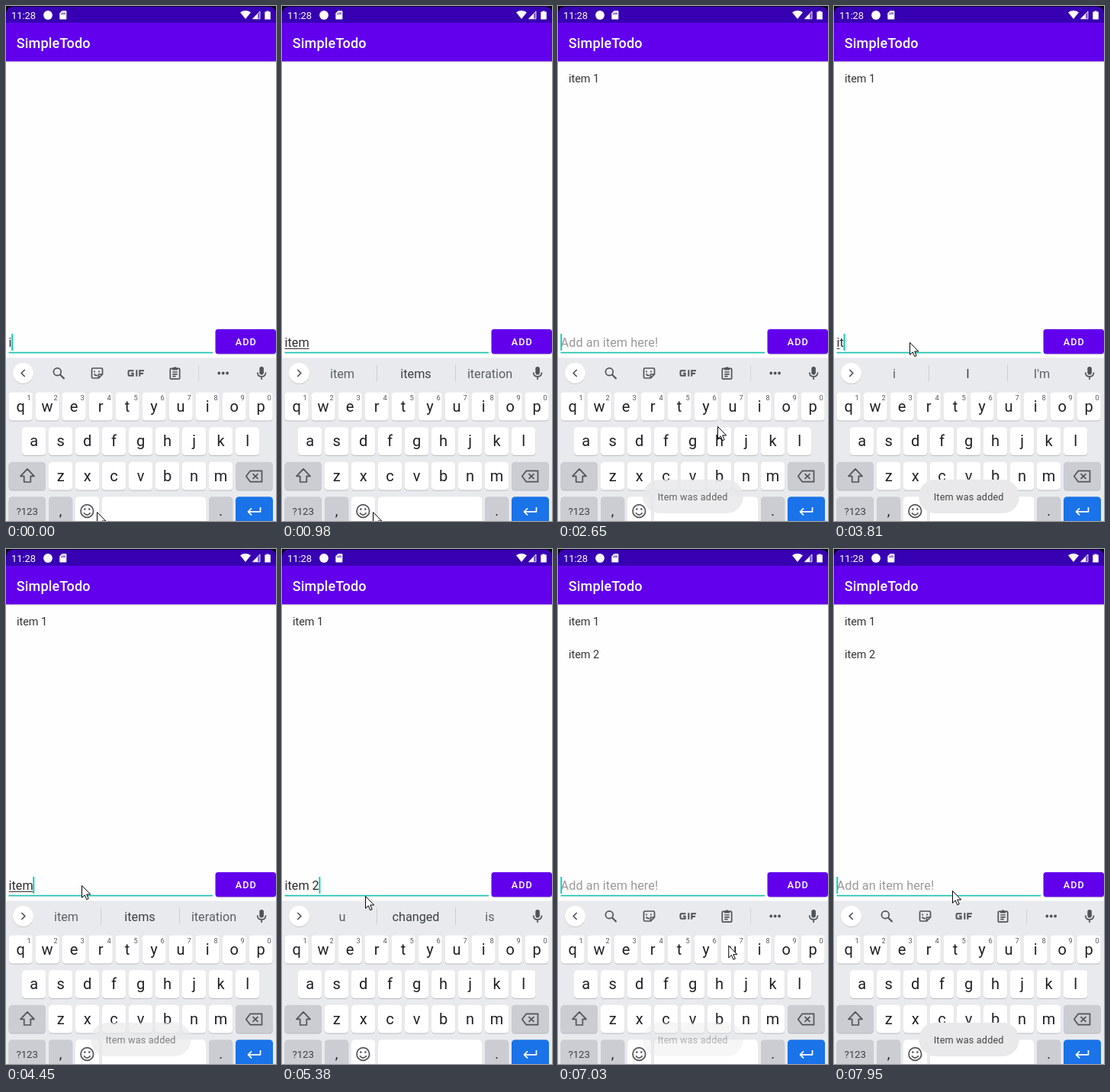
An HTML page that plays this animation: 354x674 px, repeating every 8000 ms.

```html
<!DOCTYPE html>
<html lang="en">
<head>
<meta charset="utf-8">
<title>Todo list</title>
<style>
  html, body { margin: 0; width: 100%; height: 100%; overflow: hidden; background: #fff; }
  svg { display: block; width: 354px; height: 674px; }
  text { font-family: Roboto, "Noto Sans", sans-serif; white-space: pre; }
  .mid { text-anchor: middle; }
  .line { fill: none; stroke: #505357; stroke-width: 1.7; }
  .dark { fill: #505357; }
  .word { font-size: 16.2px; fill: #5b5f64; text-anchor: middle; }
  .item { font-size: 14.4px; fill: #333; }
  .field { font-size: 16.2px; }
</style>
</head>
<body>
<svg viewBox="0 0 354 674" xmlns="http://www.w3.org/2000/svg">
  <defs>
    <linearGradient id="shade" x2="0" y2="1">
      <stop stop-color="#000" stop-opacity=".22"/>
      <stop offset="1" stop-color="#000" stop-opacity="0"/>
    </linearGradient>
    <clipPath id="buttonClip"><rect x="274.500" y="423" width="79.500" height="32.300" rx="3.600"/></clipPath>
  </defs>

  <rect width="354" height="674" fill="#fefefe"/>
  <rect y="72" width="354" height="2.500" fill="url(#shade)"/>
  <rect y="22" width="354" height="50.400" fill="#6200ee"/>
  <rect width="354" height="22" fill="#3700b3"/>
  <path d="M0 0H354V9Q353 .7 345 .7H9Q1 .7 0 9Z"/>
  <g fill="#fff">
    <text x="7" y="16.500" font-size="12.900">11:28</text>
    <circle cx="55" cy="12" r="5.900"/>
    <path d="M73.500 6.300H78.500Q79.300 6.300 79.300 7.200V16.600Q79.300 17.500 78.500 17.500H71.200Q70.300 17.500 70.300 16.600V9.500Z"/>
    <path d="M72.800 9.300v2M74.900 8.300v3M77 8.300v3" stroke="#3700b3"/>
    <path d="M307 8.300Q314 3.500 321 8.300L314 17Z"/>
    <path d="M323.500 16.800L333 7V16.800Z" fill-opacity=".35" stroke="#fff" stroke-width=".8"/>
    <path d="M323.500 16.800L330 10V16.800Z"/>
    <path d="M341.500 6.400h3v1.200h2.300v10h-7.500v-10h2.200z"/>
    <text x="13.800" y="54.800" font-size="18" font-weight="500" letter-spacing=".16">SimpleTodo</text>
  </g>

  <text class="item" id="item1" x="14" y="100">item 1</text>
  <text class="item" id="item2" x="14" y="143.200">item 2</text>

  <text class="field" id="hint" x="3.600" y="446.300" fill="#999" letter-spacing=".08">Add an item here!</text>
  <text class="field" id="entry" x="3.600" y="446.300" fill="#2b2b2b"></text>
  <rect id="composing" x="3.600" y="448" height="1" fill="#333"/>
  <rect x="3.500" y="452.800" width="267.500" height="1.700" fill="#1fc4b0"/>
  <rect id="caret" y="429" width="1.900" height="22" fill="#03cdb9"/>

  <rect x="275" y="424" width="79" height="32.300" rx="3.600" opacity=".18"/>
  <rect x="274.500" y="423" width="79.500" height="32.300" rx="3.600" fill="#6200ee"/>
  <circle id="ripple" cx="304" cy="442" fill="#fff" opacity=".24" clip-path="url(#buttonClip)"/>
  <text x="300.700" y="443.800" font-size="12.600" font-weight="500" letter-spacing="1.120" fill="#fff">ADD</text>

  <rect y="460.500" width="354" height="214" fill="#e8eaed"/>
  <circle cx="22.500" cy="481.300" r="13.700" opacity=".14"/>
  <circle cx="22.500" cy="480.500" r="13.500" fill="#fff"/>
  <path id="chevron" class="line" d="M-2.200 -4.500L2.300 0L-2.200 4.500"/>
  <g id="tools">
    <g class="line">
      <circle cx="67.300" cy="478.800" r="4.900"/>
      <path d="M71 482.500L76.500 488" stroke-width="2.100"/>
      <path d="M114 474H125Q126.500 474 126.500 475.500V482L121.500 487H114Q112.500 487 112.500 485.500V475.500Q112.500 474 114 474ZM126.500 482H121.500V487M115.500 481.500Q117 484 120 483.500M116 477.500v2M122 477.500v2"/>
      <rect x="215.300" y="474.300" width="12.400" height="13.900" rx="1.200"/>
      <path d="M218.300 479h6.400M218.300 481.800h6.400M218.300 484.600h4.400"/>
      <path d="M167.500 477.200H161.800Q160.500 477.200 160.500 478.500V482.500Q160.500 483.800 161.800 483.800H166.600V480.800H164M171.300 476.200V484.800M175.300 484.800V477.200H181M175.300 481H180" style="stroke-width:2"/>
      <path d="M252.500 470.500V490.500" style="stroke:#d0d3d6;stroke-width:1"/>
    </g>
    <path class="dark" d="M218 473.500h2q1.500-3 3 0h2v3h-7z"/>
    <path d="M279.300 480.500h0M284.700 480.500h0M290.100 480.500h0" stroke="#505357" stroke-width="3.800" stroke-linecap="round"/>
  </g>
  <g id="words">
    <path d="M124.500 470V491.500M227.500 470V491.500" stroke="#cdd0d3"/>
    <text class="word" x="79" y="486.800"></text>
    <text class="word" x="175.500" y="486.800" style="fill:#3c4043"></text>
    <text class="word" x="272.500" y="486.800"></text>
  </g>
  <rect class="dark" x="332.300" y="472" width="5.600" height="10.500" rx="2.800"/>
  <path class="line" d="M329.700 479.500Q329.700 485 335.100 485T340.500 479.500M335.100 485V489"/>

  <g id="keys"></g>
  <g class="line" stroke-linejoin="round">
    <path d="M28 605.800L37 615.300H32.300V623H23.700V615.300H19Z"/>
    <path d="M320.300 608.300H335.500V622.700H320.300L314.800 615.500Z"/>
    <path d="M323.500 612.200L330.500 618.900M330.500 612.200L323.500 618.900"/>
    <circle cx="106.300" cy="661" r="8.300"/>
    <path d="M102 663.300Q106.300 669 110.600 663.300"/>
    <path d="M333.500 656V661.800H318M322 657.300L317.500 661.800L322 666.300" stroke="#fff"/>
  </g>
  <path d="M103.300 658.500h0M109.300 658.500h0" stroke="#505357" stroke-width="2.600" stroke-linecap="round"/>

  <g id="toast">
    <rect x="111" y="619.800" width="132" height="44.200" rx="22" fill="#e9e9eb"/>
    <text x="130.700" y="646.800" font-size="12.600" letter-spacing=".2" fill="#444">Item was added</text>
  </g>
  <path id="pointer" d="M.5 .5V16.300L4.200 12.900L6.700 18.700L9.200 17.600L6.700 12H11.700Z" fill="#fff" stroke="#000"/>
</svg>
<script>
const LOOP = 8000;
const LAG = 120;     // the keyboard's suggestions trail the typing
const BLINK = 480;   // the caret toggles this often after the last edit

const rounds = [
  { text: "item 1", keys: [0, 120, 240, 490, 1380, 1630], added: 2400 },
  { text: "item 2", keys: [3690, 3810, 3930, 4330, 4600, 5260], added: 6910 }
];

// Suggestions by number of characters typed; the space offers next words.
const suggestions = ["", "i|I|I'm", "it|It|it's", "ite|item|items", "item|items|iteration", "u|changed|is", ""];

const moves = [
  { from: 1500, to: 1890, x: 313, y: 502 },
  { from: 1890, to: 2150, x: 304, y: 442 },
  { from: 2400, to: 2650, x: 209, y: 550 },
  { from: 2650, to: 2890, x: 99, y: 440 },
  { from: 5140, to: 5260, x: 109, y: 454 },
  { from: 5500, to: 6250, x: 298, y: 438 },
  { from: 6800, to: 7050, x: 222, y: 520 },
  { from: 7050, to: 7300, x: 155, y: 447 }
];

const $ = id => document.getElementById(id);
const set = (id, name, value) => $(id).setAttribute(name, value);
const show = (id, visible) => set(id, "display", visible ? "inline" : "none");
const clamp = v => Math.min(1, Math.max(0, v));
const smooth = v => v * v * (3 - 2 * v);

function key(x, y, width = 31.2, fill = "#fff") {
  const box = (top, color) =>
    `<rect x="${x}" y="${top}" width="${width}" height="36.700" rx="4.500" fill="${color}"/>`;
  return box(y + 1, "#b9bcc1") + box(y, fill);
}

function label(text, x, y, size = 20, color = "#202124") {
  return `<text class="mid" x="${x}" y="${y}" font-size="${size}" fill="${color}">${text}</text>`;
}

const PITCH = 35;
const GREY = "#cbcdd2";
const rowTop = row => 505.8 + 45.5 * row;

function letterRow(letters, row) {
  const left = 3.5 + (10 - letters.length) / 2 * PITCH;
  return [...letters].map((letter, i) => {
    const x = left + i * PITCH, y = rowTop(row);
    const digit = row ? "" : label((i + 1) % 10, x + 26.7, y + 10.3, 9.3, "#55595e");
    return key(x, y) + label(letter, x + 15.6, y + 24.9) + digit;
  }).join("");
}

$("keys").innerHTML =
  ["qwertyuiop", "asdfghjkl", "zxcvbnm"].map(letterRow).join("") +
  [2, 3].map(row =>
    key(3.5, rowTop(row), 48.5, GREY) + key(301, rowTop(row), 49, row < 3 ? GREY : "#1a73e8")
  ).join("") +
  key(56, rowTop(3), 31.2, GREY) + key(91, rowTop(3)) + key(126, rowTop(3), 136) +
  key(266, rowTop(3), 31.2, GREY) +
  label("?123", 27.7, 666, 13.2, "#3c4043") + label(",", 71.6, 667, 18) + label(".", 281.6, 667, 18);

function typedCount({ keys, added }, t) {
  return t < added ? keys.filter(time => time <= t).length : 0;
}

function pointerAt(t) {
  let x = 119, y = 662;
  for (const move of moves) {
    const p = smooth(clamp((t - move.from) / (move.to - move.from)));
    x += (move.x - x) * p;
    y += (move.y - y) * p;
  }
  return [x, y];
}

function drawEntry(t, round) {
  const count = typedCount(round, t);
  const known = typedCount(round, t - LAG);
  const entry = $("entry");
  entry.textContent = round.text.slice(0, count);
  show("hint", !count);

  const widthOf = n => n ? entry.getSubStringLength(0, n) : 0;
  set("composing", "width", widthOf(known < 5 ? Math.min(known, count) : 0));
  set("caret", "x", 3.3 + widthOf(count));
  const lastEdit = [...round.keys, round.added].findLast(time => time <= t);
  show("caret", Math.floor((t - lastEdit) / BLINK) % 2 === 0);
}

const wordLabels = document.querySelectorAll(".word");

function drawSuggestions(t, round) {
  const done = typedCount(round, t - 2 * LAG) === round.text.length;
  const known = Math.min(typedCount(round, t - LAG), 5);
  const words = done || !typedCount(round, t) ? "" : suggestions[known];
  show("tools", !words);
  show("words", words);
  words.split("|").forEach((word, i) => { wordLabels[i].textContent = word; });
  set("chevron", "transform", `translate(22.5 480.5) scale(${words ? 1 : -1} 1)`);
}

function draw(t) {
  const round = rounds.findLast(({ keys }) => keys[0] <= t);
  drawEntry(t, round);
  drawSuggestions(t, round);
  rounds.forEach(({ added }, i) => show(`item${i + 1}`, t >= added));

  const press = t - round.added + 250;
  set("ripple", "r", press < 370 ? 60 * clamp(press / 250) : 0);

  const lastAdded = rounds.findLast(({ added }) => added <= t)?.added ?? Infinity;
  const age = t - lastAdded;
  set("toast", "opacity", Math.min(clamp(age / 300), clamp((2320 - age) / 400)));
  set("pointer", "transform", `translate(${pointerAt(t)})`);
}

const began = performance.now();
function tick() {
  draw((performance.now() - began) % LOOP);
  requestAnimationFrame(tick);
}
tick();
</script>
</body>
</html>
```
